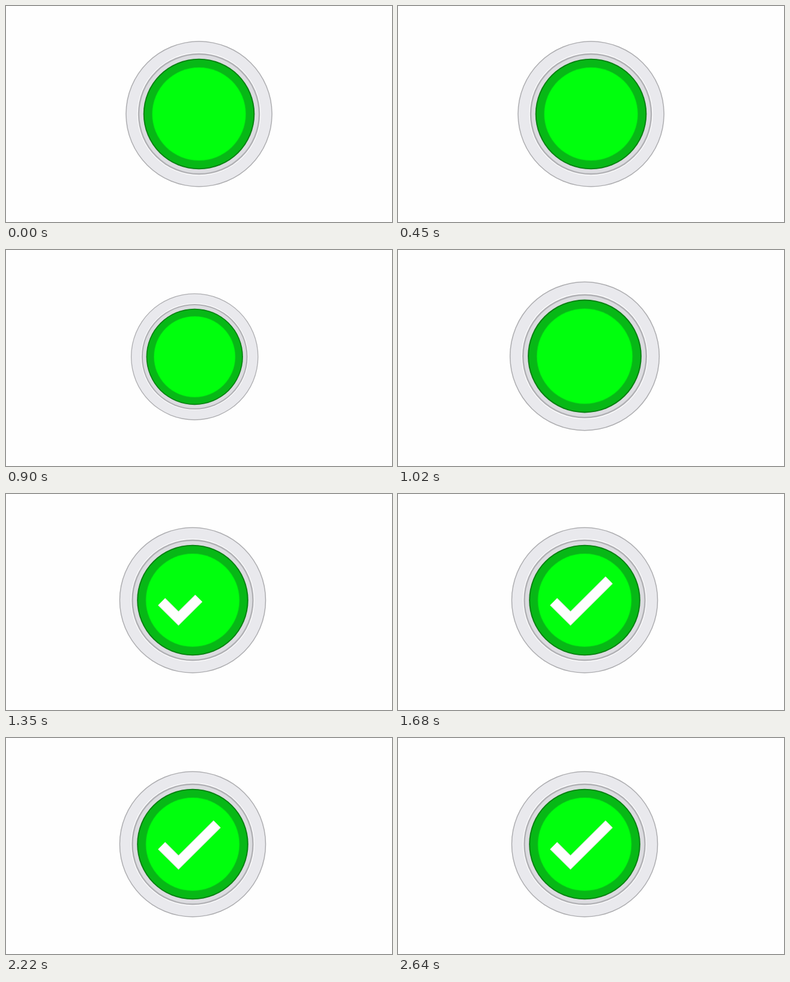
Recreate the animation shown at these times as an HTML page with a canvas. Size 640 by 360 pixels, loop 2.67 s.

```html
<!DOCTYPE html>
<html lang="en">
<head>
<meta charset="utf-8">
<title>Confirm button</title>
<style>
html, body { margin: 0; width: 100%; height: 100%; overflow: hidden; background: #fefefe; }
canvas { display: block; }
</style>
</head>
<body>
<canvas id="stage" width="640" height="360"></canvas>
<script>
const ctx = document.getElementById('stage').getContext('2d');
const LOOP = 2670, STEP = 30;
const TICK = [[258, 179.5], [286, 207.5], [350, 143.5]];

const progress = (t, from, to) => Math.min(1, Math.max(0, (t - from) / (to - from)));
const smooth = p => p * p * (3 - 2 * p);
const mix = (a, b, p) => a + (b - a) * p;

// [time, scale]: shrink, spring past full size, settle
const SCALE_KEYS = [[570, 1], [780, 0.366], [960, 1.045], [1080, 1]];

function scaleAt(t) {
  let value = 1;
  for (let i = 1; i < SCALE_KEYS.length; i++) {
    const [from, a] = SCALE_KEYS[i - 1], [to, b] = SCALE_KEYS[i];
    if (t >= from) value = mix(a, b, smooth(progress(t, from, to)));
  }
  return value;
}

function disc(radius, color) {
  ctx.fillStyle = color;
  ctx.beginPath();
  ctx.arc(0, 0, radius, 0, Math.PI * 2);
  ctx.fill();
}

function button(x, y, scale) {
  ctx.save();
  ctx.translate(x, y);
  ctx.scale(scale, scale);
  disc(121.7, '#adadb0');
  disc(120.2, '#e9e9ed');
  disc(102.6, '#fcfcfd');
  disc(101.2, '#b0b0b4');
  disc(98.8, '#dcdce0');
  disc(92.3, '#067f10');
  disc(90.4, '#07b816');
  disc(78, '#03dc12');
  disc(77, '#00ff0d');
  ctx.restore();
}

function strokeTick(points, width, color) {
  ctx.strokeStyle = color;
  ctx.lineWidth = width;
  ctx.lineJoin = 'miter';
  ctx.beginPath();
  points.forEach(([x, y]) => ctx.lineTo(x, y));
  ctx.stroke();
}

function tick(p) {
  if (p <= 0) return;
  const [a, b, c] = TICK;
  const short = Math.hypot(b[0] - a[0], b[1] - a[1]);
  const long = Math.hypot(c[0] - b[0], c[1] - b[1]);
  const drawn = p * (short + long);
  const along = (m, n, q) => [mix(m[0], n[0], q), mix(m[1], n[1], q)];
  const points = drawn <= short
    ? [a, along(a, b, drawn / short)]
    : [a, b, along(b, c, (drawn - short) / long)];
  strokeTick(points, 17.4, '#a5d9a8');
  strokeTick(points, 16, '#fefefe');
}

function draw(t) {
  ctx.fillStyle = '#fefefe';
  ctx.fillRect(0, 0, 640, 360);
  const shift = progress(t, 630, 1020);
  button(mix(320, 309.5, shift), mix(180, 177, shift), scaleAt(t));
  tick(smooth(progress(t, 1110, 1500)));
}

function loop() {
  const t = performance.now() % LOOP;
  draw(Math.floor(t / STEP) * STEP);
  requestAnimationFrame(loop);
}
loop();
</script>
</body>
</html>
```
